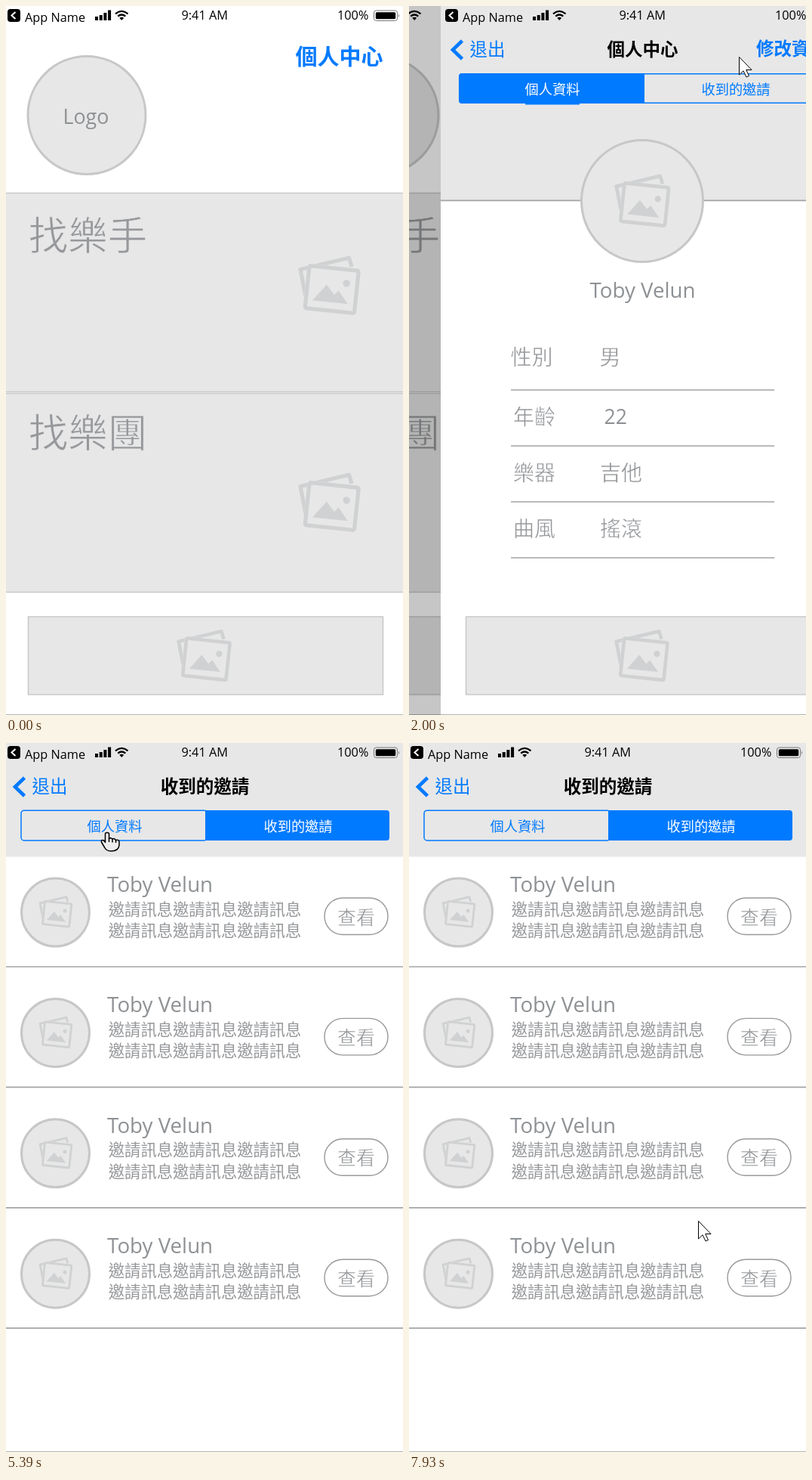
Animation, 526 px wide and 938 px high, one loop 8000 ms. Source, as an HTML page:

```html
<!DOCTYPE html>
<html lang="zh-Hant">
<head>
<meta charset="utf-8">
<title>App prototype</title>
<style>
  html, body { margin: 0; width: 100%; height: 100%; overflow: hidden; background: #fff; }
  svg { display: block; }
  text { font-family: "Open Sans", "Noto Sans", sans-serif; fill: #8e9194; }
  .zh { font-family: "Noto Sans CJK TC", "Noto Sans CJK JP", "Noto Sans CJK", sans-serif; font-weight: 300; fill: #96989b; }
  .bold { font-weight: 700; }
  .mid { text-anchor: middle; }
  /* A background-coloured edge slims the strokes of large characters */
  .big { font-size: 52.5px; stroke: #e7e7e7; stroke-width: .9; }
  .slim { stroke: #fff; stroke-width: .45; }
  .status text { font-size: 16.3px; fill: #000; }
  .head { font-size: 23.5px; }
  .tab { font-size: 18.2px; text-anchor: middle; }
  .name { font-size: 27.7px; }
  .info text { font-size: 28px; }
  .note { font-size: 21.3px; }
  .black { fill: #000; }
  .blue { fill: #007aff; }
  .white { fill: #fff; }
  .panel { fill: #e7e7e7; }
  .box { fill: #e7e7e7; stroke: #c5c6c7; stroke-width: 1.4; }
  .ring { fill: #e7e7e7; stroke: #c6c7c8; stroke-width: 3; }
  .outline { fill: none; stroke: #007aff; stroke-width: 1.5; }
  .rule { fill: none; stroke: #a3a4a6; stroke-width: 1.7; }
  .foot { stroke: #b4b5b6; stroke-width: 1; }
</style>
</head>
<body>
<svg width="526" height="938" viewBox="0 0 526 938">
  <defs>
    <g id="photos" fill="none" stroke="#d0d1d2" stroke-width="5.2" stroke-linejoin="round">
      <path d="M10 54L3 18.500L67.500 3.200L71 15"/>
      <g transform="translate(44.700 45) rotate(6)">
        <rect x="-35.500" y="-31" width="71" height="62" fill="#e7e7e7" stroke="none"/>
        <rect x="-32.800" y="-28.200" width="65.600" height="56.400" rx="2"/>
        <path d="M-24 17L-7.500-5.500L4 6.500L9 .500L23 17Z" fill="#d0d1d2" stroke="none"/>
        <circle cx="18.500" cy="-10" r="4.700" fill="#d0d1d2" stroke="none"/>
      </g>
    </g>

    <g id="status" class="status">
      <rect x="2" y="4" width="17" height="17" rx="4"/>
      <path d="M12.500 8L7.500 12.500L12.500 17" fill="none" stroke="#fff" stroke-width="2"/>
      <text x="25" y="20.500">App Name</text>
      <path d="M118 14h4v5h-4zM123.700 12h4v7h-4zM129.400 9h4v10h-4zM135.100 5.500h4v13.500h-4z"/>
      <path d="M145 10.300Q153.200 3.500 161.500 10.300M148.200 13.600Q153.200 9.400 158.300 13.600" fill="none" stroke="#000" stroke-width="2.300"/>
      <path d="M150.300 15.700Q153.200 13.600 156.200 15.700L153.200 19Z"/>
      <text class="mid" x="263.200" y="17.700">9:41 AM</text>
      <text x="439" y="17.700">100%</text>
      <rect x="487.500" y="6" width="31" height="13.500" rx="3" fill="none" stroke="#777"/>
      <rect x="489.800" y="8.200" width="26.400" height="9" rx="1.500"/>
      <path d="M520 10.500q2 2.300 0 4.600z" fill="#777"/>
    </g>

    <g id="back">
      <path d="M24.500 46L12 58L24.500 70" fill="none" stroke="#007aff" stroke-width="4.600"/>
      <text class="zh head blue" x="34.500" y="66">退出</text>
    </g>

    <g id="banner">
      <rect class="box" x="29.500" y="808" width="470" height="103"/>
      <use href="#photos" transform="translate(226 824.500) scale(.88)"/>
    </g>

    <path id="foot" class="foot" d="M-4 937.500H530"/>

    <g id="invite">
      <circle class="ring" cx="65.500" cy="224" r="45"/>
      <use href="#photos" transform="translate(43.500 202) scale(.54)"/>
      <text class="name" x="134" y="197">Toby Velun</text>
      <text class="zh note" x="135.800" y="227.500">邀請訊息邀請訊息邀請訊息</text>
      <text class="zh note" x="135.800" y="256">邀請訊息邀請訊息邀請訊息</text>
      <rect x="422" y="205" width="84" height="48.500" rx="24.200" fill="none" stroke="#97999c" stroke-width="1.400"/>
      <text class="zh slim mid" x="464" y="239.500" font-size="25">查看</text>
      <path class="rule" d="M0 296H526"/>
    </g>
  </defs>

  <g id="home">
    <rect class="white" width="526" height="938"/>
    <use href="#status"/>
    <text class="zh bold blue" x="383.500" y="77.500" font-size="29">個人中心</text>
    <circle class="ring" cx="107" cy="144.500" r="78"/>
    <text class="mid" x="106" y="156" font-size="26.800">Logo</text>
    <rect class="box" x="-4" y="247.500" width="534" height="263"/>
    <rect class="box" x="-4" y="512.500" width="534" height="263"/>
    <text class="zh big" x="29.800" y="323">找樂手</text>
    <text class="zh big" x="29.800" y="584">找樂團</text>
    <use href="#photos" x="387" y="330"/>
    <use href="#photos" x="387" y="617"/>
    <use href="#banner"/>
    <use href="#foot"/>
  </g>
  <rect id="shade" width="526" height="938" opacity="0"/>

  <g id="profile" display="none">
    <rect class="white" x="-4" width="534" height="938"/>
    <rect class="panel" x="-4" width="534" height="257"/>
    <path class="rule" d="M-4 257.300H530"/>
    <use href="#status"/>
    <use href="#back"/>
    <text class="zh head bold black mid" x="263.500" y="65.500">個人中心</text>
    <text class="zh head bold blue" x="414" y="65">修改資料</text>
    <rect class="outline" x="20.700" y="89.700" width="487" height="38.600" rx="4"/>
    <path class="blue" d="M24 89H266V129H180V130.500H108V129H24Q20 129 20 125V93Q20 89 24 89Z"/>
    <text class="zh tab white" x="144" y="116.500">個人資料</text>
    <text class="zh tab blue" x="387" y="116.500">收到的邀請</text>
    <circle class="ring" cx="263" cy="258" r="80.500"/>
    <use href="#photos" transform="translate(226 222) scale(.9)"/>
    <text class="name mid" x="263.500" y="386">Toby Velun</text>
    <g class="info">
      <text class="zh slim" x="88.500" y="475.300">性別</text><text class="zh slim" x="206.500" y="475.300">男</text>
      <text class="zh slim" x="92" y="554">年齡</text><text x="212.500" y="553" style="font-size:26.500px">22</text>
      <text class="zh slim" x="92" y="627.500">樂器</text><text class="zh slim" x="207" y="627.500">吉他</text>
      <text class="zh slim" x="92" y="701.500">曲風</text><text class="zh slim" x="207" y="701.500">搖滾</text>
    </g>
    <path class="rule" d="M89 508H438M89 582H438M89 656H438M89 730H438"/>
    <use href="#banner"/>
    <use href="#foot"/>
  </g>

  <g id="invites" display="none">
    <rect class="white" width="526" height="938"/>
    <rect class="panel" width="526" height="150.500"/>
    <use href="#status"/>
    <use href="#back"/>
    <text class="zh head bold black mid" x="263.500" y="65.500">收到的邀請</text>
    <rect class="outline" x="20" y="89.200" width="246.500" height="39.700" rx="4"/>
    <path class="blue" d="M264 89H504Q508 89 508 93V125Q508 129 504 129H264Z"/>
    <text class="zh tab blue" x="144" y="116.500">個人資料</text>
    <text class="zh tab white" x="387" y="116.500">收到的邀請</text>
    <use href="#invite"/>
    <use href="#invite" y="159.400"/>
    <use href="#invite" y="318.800"/>
    <use href="#invite" y="478.200"/>
    <use href="#foot"/>
  </g>

  <g id="cursor" stroke="#000" stroke-linejoin="round" display="none">
    <path id="arrow" fill="#fff" d="M.500 .500V24L6 18.800L10 27L13.500 25.500L9.700 17.500H17Z"/>
    <g id="hand" fill="#ededed" stroke-width="1.500">
      <path d="M-2.500 2.600Q-2.500 .500 0 .500T2.500 2.600V8.500Q4.500 6.500 7 9Q9.500 7.500 11.500 10.500Q16 9.500 16 13V17Q15.500 25 5 25Q-1 25 -3.500 20L-7.300 13.500Q-8.500 10.500 -6 10.500Q-4.200 10.500 -2.500 13.500Z"/>
      <path d="M2.500 8.500V13M7 9V13.500M11.500 10.500V14"/>
    </g>
  </g>
</svg>

<script>
const LOOP = 8000, WIDTH = 526;
const el = id => document.getElementById(id);
const [home, shade, profile, invites, cursor, arrow, hand] =
  ["home", "shade", "profile", "invites", "cursor", "arrow", "hand"].map(el);

// Page shown from each tick on
const pages = [[0, home], [22, profile], [41, invites], [52, profile],
               [64, invites], [73, profile], [96, invites]];

// Pointer keys: tick, x, y, and 1 for the hand
const keys = [
  [5, 368, 790], [8, 371, 680], [12, 405, 210], [15, 434, 80],
  [16, 435, 79, 1], [17, 438, 67, 1], [21, 438, 67, 1],
  [22, 437, 67], [32, 437, 67], [35, 372, 105, 1],
  [41, 372, 105], [44, 372, 105], [47, 245, 110, 1], [50, 116, 108, 1],
  [52, 115, 108], [56, 275, 104, 1], [60, 385, 108, 1],
  [64, 385, 108], [67, 250, 108, 1], [70, 134, 118, 1], [74, 134, 118, 1],
  [75, 160, 108], [79, 426, 60], [82, 392, 268], [84, 393, 564], [86, 393, 564],
  [90, 362, 250], [93, 330, 114, 1], [96, 330, 114], [103, 383, 632]
];

const lastBefore = (list, tick) => list.filter(item => item[0] <= tick).pop();
const show = (node, on) => node.setAttribute("display", on ? "inline" : "none");
const move = (node, x, y = 0) => node.setAttribute("transform", `translate(${x} ${y})`);

// The screen refreshes 13 times a second, slightly ahead in the opening
const tickAt = ms => Math.floor(ms * 0.013 + (ms < 1500 ? 0.28 : 0.04));

function slide(tick) {
  if (tick >= 27) return 1;
  const u = Math.max(0, (tick - 21) / 6.18);
  return (1 - Math.cos(Math.PI * u)) / 2;
}

function drawPages(tick) {
  const page = lastBefore(pages, tick)[1];
  const p = slide(tick);
  show(home, p < 1);
  show(profile, page === profile);
  show(invites, page === invites);
  move(home, Math.round(-160 * p));
  move(profile, Math.round(WIDTH * (1 - p)));
  shade.setAttribute("opacity", p < 1 ? 0.245 * p : 0);
}

function drawCursor(tick) {
  const a = lastBefore(keys, tick);
  show(cursor, a);
  if (!a) return;
  const b = keys[keys.indexOf(a) + 1] || a;
  const u = a === b ? 0 : (tick - a[0]) / (b[0] - a[0]);
  const at = i => Math.round(a[i] + (b[i] - a[i]) * u);
  move(cursor, at(1), at(2));
  show(hand, a[3]);
  show(arrow, !a[3]);
}

let start = null;
function frame(now) {
  start ??= now;
  const tick = tickAt((now - start) % LOOP);
  drawPages(tick);
  drawCursor(tick);
  requestAnimationFrame(frame);
}
requestAnimationFrame(frame);
</script>
</body>
</html>
```
